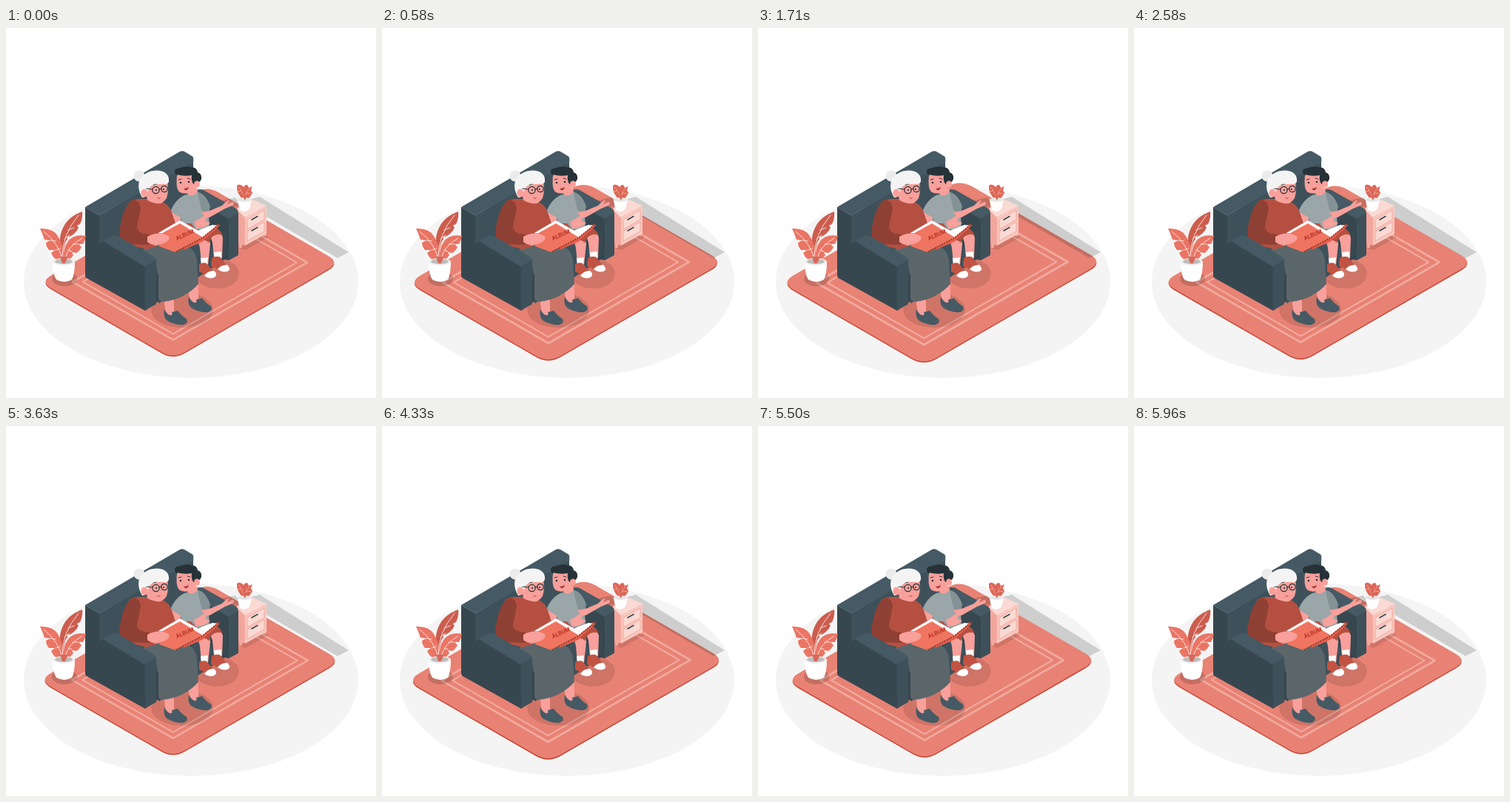
Animation of 500x500 px, one loop 6000 ms. Source, as an HTML page:

```html
<!DOCTYPE html>
<html lang="en">
<head>
<meta charset="utf-8">
<title>Reading together</title>
<style>
html, body { margin: 0; width: 100%; height: 100%; overflow: hidden; background: #fff; }
svg { display: block; width: 100%; height: 100%; }
.line { fill: none; stroke-linecap: round; stroke-linejoin: round; }
.skin { fill: #f8a09b; }
.dark { fill: #37474f; }
.slate { fill: #455a64; }
.red { fill: #b55041; }
.shade { fill: #000; opacity: .15; }
.soft { fill: #000; opacity: .1; }
</style>
</head>
<body>
<svg viewBox="0 0 500 500">
  <ellipse cx="250" cy="343" rx="226" ry="130" fill="#f4f4f4"/>

  <g id="rug">
    <path id="mat" fill="#c9402f"/>
    <path id="top" fill="#e88274"/>
    <path id="outer" class="line" stroke="#f1aa9f" stroke-width="2.6"/>
    <path id="inner" class="line" stroke="#f1aa9f" stroke-width="2"/>
  </g>

  <!-- floor shadows -->
  <g class="shade">
    <path d="M331 231L343 228L463 303L448 311L345 251Z"/>
    <ellipse cx="79" cy="339" rx="17" ry="10"/>
    <path d="M288 234L310 229L318 240L304 243Z"/>
  </g>
  <g class="soft">
    <ellipse cx="285" cy="332" rx="30" ry="20"/>
    <ellipse cx="238" cy="381" rx="42" ry="24"/>
    <path d="M314 297L324 300L354 283L352 278Z"/>
  </g>

  <!-- nightstand -->
  <path fill="#f3a79c" d="M313 244L323 255V294L313 290Z"/>
  <path fill="#f3a79c" d="M315 290H319V297H315ZM348 275H352V281H348Z"/>
  <path fill="#fbdad4" d="M311 245L331 231L352 240L323 256Z"/>
  <path fill="#f9c8c0" d="M323 256L352 240V278L323 294Z"/>
  <path fill="#fbd9d3" stroke="#ee9f94" stroke-width=".8" d="M326 259L349 246V259L326 272ZM326 275L349 262V275L326 288Z"/>
  <path class="line" stroke="#37474f" stroke-width="1.6" d="M332 259L340 254.5M332 274L340 269.5"/>
  <path fill="#dc6858" d="M321 232Q311 224 312 213Q315 210 319 213L321 215Q324 210 327 213L328 216L333 214L331 219L333 223Q330 230 324 232Z"/>
  <path class="line" stroke="#f6bbb1" stroke-width=".7" d="M322 231Q320 222 315 215M323 231Q324 221 329 217M317 220L313 221M325 223L331 224"/>
  <path fill="#fff" d="M313 232Q315 247 318 247Q323 249 327 246Q331 244 331 232Z"/>
  <ellipse cx="322" cy="232" rx="9" ry="3" fill="#e6e6e6"/>
  <path fill="#dc6858" d="M319 226H326L323 233Z"/>

  <!-- sofa back and far arm -->
  <path fill="#3e515b" d="M126 253L253 180V240L300 256V310L207 372L126 300Z"/>
  <path class="slate" d="M107 242L234 167.5Q238 165 242 167.5L252 173.5Q254 175 253 182L126 253Z"/>
  <path class="dark" d="M253 221L274 239L301 258V314L292 312L250 270Z"/>
  <path class="slate" d="M253 221Q260 216 267 219L311 244Q315 247 313 251L301 258L270 240Z"/>
  <path fill="#3e515b" d="M301 257L314 249V307L301 314Z"/>

  <!-- boy -->
  <g>
    <path class="skin" d="M246 218L258 216L260 228Q252 233 245 228Z"/>
    <path class="skin" d="M222 246L236 250L236 266L224 262Z"/>
    <path fill="#9ba6a9" d="M239 227Q242 225 246 225Q252 229 259 222Q270 224 273 238L275 270L240 276L236 256L222 248Q229 232 239 227Z"/>
    <path fill="#849195" d="M259 223Q270 224 276 241L275 248Q267 252 264 245Z"/>
    <path class="skin" d="M264 249Q268 256 275 256L296 244L306 240Q310 236 306 235L299 238L302 233Q299 232 292 240L275 247Z"/>
    <path class="skin" d="M231 200Q229 218 235 222Q244 226 252 221L257 214L253 196H234Z"/>
    <path fill="#263238" d="M228 195Q227 190 235 189Q243 186 250 188Q258 188 259 195Q265 197 264 204Q262 210 257 209Q254 213 252 209Q250 204 251 199Q241 201 231 198Q229 199 228 195Z"/>
    <ellipse class="skin" cx="258" cy="211" rx="4" ry="4.5"/>
    <g fill="#263238"><circle cx="236" cy="209" r="1.3"/><circle cx="247" cy="208" r="1.3"/></g>
    <path class="line" stroke="#263238" stroke-width=".9" d="M233 205L237 204M245 203L249 204"/>
    <path fill="#a33932" d="M240 217Q244 217 247 215Q246 220 242 219Z"/>
    <path class="skin" d="M259 286L274 282L276 292L273 320L264 320L262 297Z"/>
    <path class="skin" d="M275 278Q290 273 293 283L292 311L281 311L279 290Z"/>
    <path class="red" d="M252 282L276 267Q288 269 293 280Q283 277 277 284L274 290Q267 283 258 293Z"/>
    <path fill="#fff" d="M263 311L273 310L272 321L264 321ZM281 303L291 302L291 313L282 314Z"/>
    <path fill="#c25342" d="M261 319Q267 316 271 318L281 330L272 335L261 329Z"/>
    <path fill="#c25342" d="M278 311Q285 307 290 310L299 322L289 327L277 322Z"/>
    <path fill="#fff" d="M268 335Q272 328 281 328Q286 332 283 336Q276 341 268 335ZM286 326Q290 320 299 320Q304 325 301 328Q294 332 286 326Z"/>
  </g>

  <!-- grandmother -->
  <g>
    <path class="skin" d="M213 363H227V390L216 388ZM246 345H260V373L248 371Z"/>
    <path id="shoe" class="slate" d="M214 380Q212 390 217 395Q228 402 240 401Q247 398 244 393Q237 389 232 382L224 384Q226 389 221 388Q217 386 214 380Z"/>
    <use href="#shoe" x="33" y="-17"/>
    <path fill="#5b666a" d="M186 290L240 294Q257 298 258 315L260 346Q241 367 212 370Q206 370 206 362L204 322L186 303Z"/>
    <path class="skin" d="M191 222L212 228L210 240H190Z"/>
    <path class="red" d="M170 233Q180 230 189 231Q198 239 211 235Q220 238 224 249L229 264L250 264L257 272L236 282L219 290L190 299L168 294Z"/>
    <path fill="#8f4034" d="M170 232Q181 232 182 244L177 268Q176 278 194 279L194 293L163 292Q152 288 153 276Q157 244 170 232Z"/>
    <circle cx="180" cy="200" r="7.5" fill="#ebebeb"/>
    <path class="skin" d="M188 210L217 204Q221 218 217 230Q211 239 203 237Q195 235 190 228Z"/>
    <path fill="#f4f4f4" d="M184 229Q176 216 181 204Q189 192 205 192.5Q219 194 220 204Q221 210 216 211Q204 210 197 213Q192 216 192 222L187 219Q183 223 187 229Z"/>
    <ellipse class="skin" cx="187" cy="223" rx="4.5" ry="5.5"/>
    <g class="line" stroke="#263238">
      <path stroke-width="1.2" d="M190 217L198 218M207 218L210 217"/>
      <circle cx="202.5" cy="219" r="4.6" stroke-width="1.2"/>
      <circle cx="214" cy="217.5" r="4.2" stroke-width="1.2"/>
      <path stroke-width=".8" d="M199 212L203 211"/>
    </g>
    <g fill="#263238"><circle cx="203" cy="219" r="1.1"/><circle cx="213" cy="218" r="1.1"/></g>
    <path class="line" stroke="#b5403a" stroke-width="1.2" d="M205 230L208 230"/>
  </g>

  <!-- near arm of the sofa -->
  <path class="dark" d="M107 242L126 253V292L131 288L188 322V382L109 338Q107 337 107 334Z"/>
  <path class="slate" d="M131 288L143 281Q147 278 151 281L200 309Q203 311 203 315L188 323Z"/>
  <path fill="#3e515b" d="M188 322L203 313V373L188 382Z"/>
  <path class="dark" d="M203 330L206 333V369L203 371Z"/>

  <!-- book -->
  <path fill="#e65c49" d="M251 277L287 265L289 267L265 289L239 300Z"/>
  <path fill="#fff" d="M253 276L279 266L285 267L263 285L250 284Z"/>
  <path fill="#fff" stroke="#d9cfcc" stroke-width=".5" d="M206 277L235 260L267 278L262 284Z"/>
  <path fill="#f07561" d="M206 280L235 264L266 283L229 303L207 295Z"/>
  <path class="line" stroke="#8f3329" stroke-width="1.8" stroke-dasharray=".5 3" d="M230 302L265 284L287 266"/>
  <text transform="matrix(.82 -.36 .4 .85 231 287)" font-family="Roboto, Arial, sans-serif" font-size="8.5" font-weight="700" fill="#b83427">ALBUM</text>
  <path class="skin" d="M191 282Q201 276 212 278L220 281Q222 287 215 290L203 294Q194 292 191 289Z"/>
  <path class="skin" d="M254 262L263 257Q268 252 272 255L269 261L276 263Q270 270 257 271Z"/>

  <!-- large plant -->
  <path fill="#cc5d4e" d="M75 314Q69 286 77 270Q84 255 103 248Q104 258 100 265L96 267L98 270Q94 278 86 282L83 282L83 285Q77 293 77 314Z"/>
  <path fill="#ea7564" d="M76 316Q65 314 61 304L66 300L58 300Q54 295 54 290L60 287L52 286Q49 277 46 271Q63 270 70 281Q78 294 79 316Z"/>
  <path fill="#ea7564" d="M78 317Q76 298 84 288Q92 278 108 281Q107 287 104 292L98 292L102 296Q99 302 95 304L89 303L91 307Q86 314 80 317Z"/>
  <path class="line" stroke="#fbe0dc" stroke-width="1" d="M76 312Q75 280 98 253M77 315Q71 290 51 275M79 315Q83 294 103 284M79 285L86 280M84 273L92 270M73 298L67 300M67 288L60 287M84 300L89 302M90 292L97 292"/>
  <path fill="#fff" d="M63 316H93Q93 332 89 340Q79 346 68 340Q63 332 63 316Z"/>
  <ellipse cx="78" cy="316" rx="15" ry="5" fill="#f0f0f0"/>
  <ellipse cx="78" cy="315.5" rx="12" ry="3.6" fill="#bdbdbd"/>
  <path fill="#d56a5c" d="M73 309H84L80 318H76Z"/>
</svg>
<script>
const LOOP = 6000, CX = 248.5, CY = 330;
const $ = id => document.getElementById(id);

// Rug corners (left, top, right, bottom), moved inwards by `inset` pixels.
const corners = inset => {
  const dy = inset * 0.577;
  return [[46.5 + inset, 343], [271, 213.5 + dy], [450.5 - inset, 317], [226, 446.5 - dy]];
};
const polygon = pts => 'M' + pts.join('L') + 'Z';

function rounded(pts, cut) {
  const toward = (a, b) => {
    const k = cut / Math.hypot(b[0] - a[0], b[1] - a[1]);
    return [a[0] + (b[0] - a[0]) * k, a[1] + (b[1] - a[1]) * k];
  };
  return pts.map((p, i) => {
    const from = toward(p, pts[(i + 3) % 4]), to = toward(p, pts[(i + 1) % 4]);
    return `${i ? 'L' : 'M'}${from}Q${p} ${to}`;
  }).join('') + 'Z';
}

const edge = rounded(corners(0), 18);
$('top').setAttribute('d', edge);
$('mat').setAttribute('d', edge);
$('mat').setAttribute('transform', 'translate(0 1.5)');
$('outer').setAttribute('d', polygon(corners(44)));
$('inner').setAttribute('d', polygon(corners(58)));

// Two linear pulses of unequal pace: [time, scale]
const keys = [[-40, 1], [1130, 1.1], [3520, 1], [4790, 1.1], [5960, 1], [7130, 1.1]];

function scaleAt(t) {
  const i = keys.findIndex(k => k[0] > t);
  const [t0, s0] = keys[i - 1], [t1, s1] = keys[i];
  return s0 + (s1 - s0) * (t - t0) / (t1 - t0);
}

function draw() {
  const s = scaleAt(performance.now() % LOOP);
  $('rug').setAttribute('transform', `translate(${CX} ${CY}) scale(${s}) translate(${-CX} ${-CY})`);
  requestAnimationFrame(draw);
}
draw();
</script>
</body>
</html>
```
